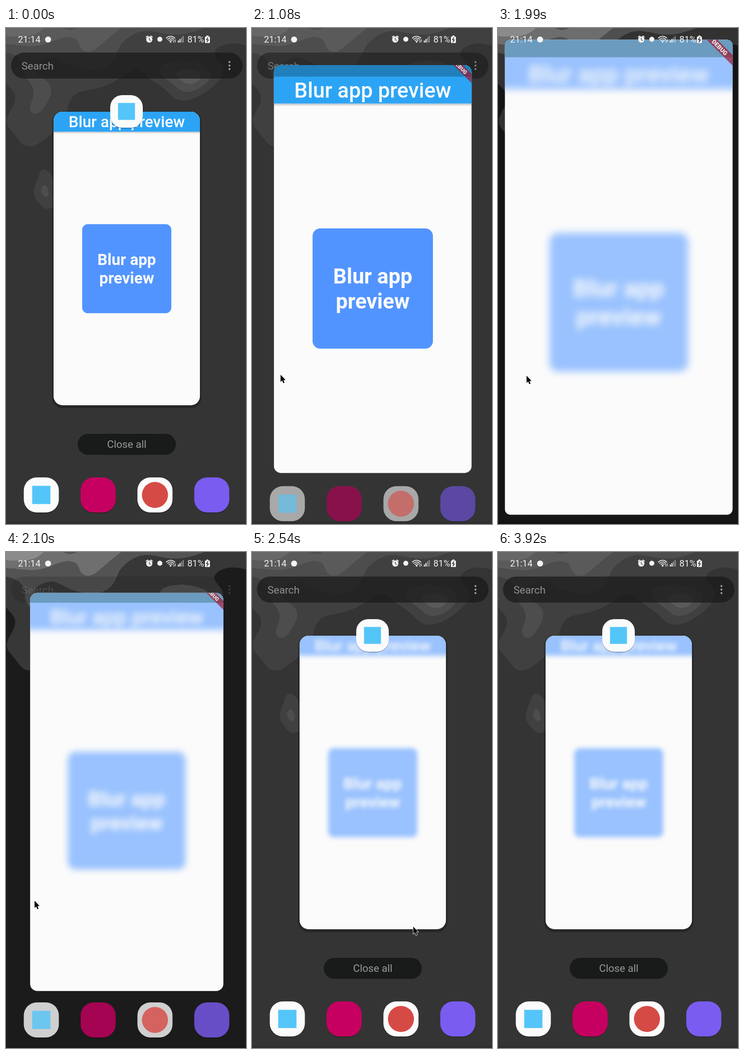
These frames come from a looping animation (479x990 px, 4010 ms). An HTML page with a canvas:

```html
<!DOCTYPE html>
<html lang="en">
<head>
<meta charset="utf-8">
<title>Blur app preview</title>
<style>
html, body { margin: 0; width: 100%; height: 100%; overflow: hidden; background: #333434; }
canvas { display: block; width: 479px; height: 990px; }
</style>
</head>
<body>
<canvas id="stage"></canvas>
<script>
const W = 479, H = 990, LOOP = 4010, MID = 241;
const OPEN = [858, 1288], BLUR = [1660, 1760], CLOSE = [1881, 2311], BADGE = [2370, 2520];
const FONT = 'Roboto, sans-serif', PAPER = '#fbfbfb', INK = '#f4f4f4';

const canvas = document.getElementById('stage');
const c = canvas.getContext('2d');
const dpr = window.devicePixelRatio || 1;
canvas.width = W * dpr;
canvas.height = H * dpr;

const clamp = v => Math.max(0, Math.min(1, v));
const lerp = (a, b, k) => a + (b - a) * k;
const span = (t, [a, b]) => clamp((t - a) / (b - a));
const smooth = u => u * u * (3 - 2 * u);
const mix = (from, to, k) => `rgb(${from.map((v, i) => Math.round(lerp(v, to[i], k)))})`;

function rect(x, y, w, h, fill) {
  c.fillStyle = fill;
  c.fillRect(x, y, w, h);
}

function box(x, y, w, h, r, fill) {
  c.fillStyle = fill;
  c.beginPath();
  c.roundRect(x, y, w, h, r);
  c.fill();
}

function disc(x, y, r, fill) {
  c.fillStyle = fill;
  c.beginPath();
  c.arc(x, y, r, 0, Math.PI * 2);
  c.fill();
}

function text(str, x, y, size, fill, weight = 400, align = 'left') {
  c.font = `${weight} ${size}px ${FONT}`;
  c.textAlign = align;
  c.fillStyle = fill;
  c.fillText(str, x, y);
}

function line(points, width, color) {
  c.strokeStyle = color;
  c.lineWidth = width;
  c.lineCap = c.lineJoin = 'round';
  c.beginPath();
  points.forEach(([x, y]) => c.lineTo(x, y));
  c.stroke();
}

// Height of the wallpaper's terrain: a slope from the top edge plus a few hills
function terrain(px, py) {
  const x = px + 13 * Math.sin(py / 29) + 6 * Math.sin(py / 13 + px / 40);
  const y = py + 12 * Math.sin(px / 34 + 1);
  const hill = (cx, cy, rx, ry, a) => a * Math.exp(-(((x - cx) / rx) ** 2) - ((y - cy) / ry) ** 2);
  return 0.1 * Math.exp(-Math.max(0, y) / 60)
    + hill(25, 5, 70, 45, 0.15)
    + hill(55, 150, 60, 110, 0.1)
    + hill(70, 325, 24, 38, 0.1)
    + hill(190, 40, 70, 80, 0.1)
    + hill(360, 90, 55, 38, 0.15);
}

// Terraced terrain as white of varying alpha, stored at double strength
const land = document.createElement('canvas');
land.width = W;
land.height = 400;
{
  const l = land.getContext('2d');
  const img = l.createImageData(W, land.height);
  const step = 0.05;
  for (let i = 0; i < W * land.height; i++) {
    const level = Math.floor(terrain(i % W, Math.floor(i / W)) / step) * step * 1.25;
    img.data.fill(255, i * 4, i * 4 + 3);
    img.data[i * 4 + 3] = clamp(level * 2) * 255;
  }
  l.putImageData(img, 0, 0);
}

function wallpaper(dark) {
  const v = Math.round(52 * (1 - dark));
  rect(0, 0, W, H, `rgb(${v},${v},${v})`);
  c.globalAlpha = clamp(0.5 + dark);
  c.drawImage(land, 0, 0);
  c.globalAlpha = 1;
  rect(0, 986, W, 4, 'rgba(0,0,0,.12)');
}

function searchBar(alpha) {
  c.globalAlpha = alpha;
  box(10, 49, 462, 52, 26, 'rgba(25,26,26,.72)');
  text('Search', 31, 83, 20.8, '#8f9090');
  for (let i = -1; i < 2; i++) disc(446, 75 + 7 * i, 1.9, '#a4a4a4');
  c.globalAlpha = 1;
}

function closeAll(alpha) {
  c.globalAlpha = alpha;
  box(143, 810, 196, 42, 21, '#191a1a');
  text('Close all', MID, 838, 20.7, '#999', 400, 'center');
  c.globalAlpha = 1;
}

function tile(x, y, size, fill) {
  const h = size / 2;
  box(x - h, y - h + 1.5, size, size, size * 0.37, 'rgba(0,0,0,.3)');
  box(x - h, y - h, size, size, size * 0.37, fill);
}

function bluePlate(x, y, size) {
  const s = size * 0.52;
  tile(x, y, size, PAPER);
  rect(x - s / 2, y - s / 2, s, s, '#54c5f8');
}

function dock(alpha, shift) {
  const y = 932 + shift;
  const x = i => 70.5 + 113.4 * i;
  c.globalAlpha = alpha;
  bluePlate(x(0), y, 70);
  tile(x(1), y, 70, '#c60060');
  tile(x(2), y, 70, PAPER);
  disc(x(2), y, 26, '#d64a45');
  tile(x(3), y, 70, '#7a5cf0');
  c.globalAlpha = 1;
}

// The app's page; blur 0..1 softens and pales everything below the status strip
function page(blur, scale) {
  const pale = [153, 194, 254];
  const left = -80, wide = 642;
  rect(left, 0, wide, 1020, PAPER);
  if (blur > 0) c.filter = `blur(${8 * blur * scale * dpr}px)`;

  const g = c.createLinearGradient(0, 108, 0, 115);
  g.addColorStop(0, 'rgba(0,0,0,.22)');
  g.addColorStop(1, 'rgba(0,0,0,.03)');
  c.globalAlpha = 1 - blur;
  rect(left, 108, wide, 6, g);
  c.globalAlpha = 1;

  rect(left, -80, wide, 188, mix([44, 164, 245], pale, blur));
  text('Blur app preview', MID, 94, 52, PAPER, 500, 'center');
  box(93, 415, 296, 296, 19, mix([82, 148, 255], pale, blur));
  text('Blur app', MID, 551, 52, PAPER, 700, 'center');
  text('preview', MID, 612, 52, PAPER, 700, 'center');
  c.filter = 'none';
  rect(left, 0, wide, 42 - 2 * blur, mix([33, 127, 187], [107, 155, 191], blur));
}

function debugRibbon() {
  c.save();
  c.translate(456.5, 19);
  c.rotate(Math.PI / 4);
  rect(-70, -8, 140, 16, 'rgba(160,20,40,.68)');
  text('DEBUG', 0, 4.6, 13, 'rgba(255,255,255,.88)', 900, 'center');
  c.restore();
}

// p: 0 in the overview, 1 at full screen
function card(p, blur) {
  const s = lerp(0.601, 1, p);
  const y0 = 142 * (1 - p) - 16 * p * (1 - p);
  const crop = 41.6 * Math.pow(1 - p, 1.5);
  const x = MID - 243 * s, y = y0 + crop * s;
  const w = 486 * s, h = (1016.6 - crop) * s;
  const r = lerp(18, 10, p);

  box(x - 3, y - 1, w + 6, h + 7, r + 3, `rgba(0,0,0,${0.25 * (1 - p) ** 12})`);
  c.save();
  c.beginPath();
  c.roundRect(x, y, w, h, r);
  c.clip();
  c.translate(MID * (1 - s), y0);
  c.scale(s, s);
  page(blur, s);
  if (p > 0) debugRibbon();
  c.restore();
}

function badge(k) {
  if (k <= 0) return;
  c.globalAlpha = k;
  bluePlate(240.5, 166.5, 65 * lerp(0.7, 1, k));
  c.globalAlpha = 1;
}

function statusBar() {
  text('21:14', 24, 29, 18, INK);
  disc(84, 23, 6, INK);

  // alarm clock
  disc(286, 23, 6.2, INK);
  line([[280, 18], [283, 16]], 2, INK);
  line([[289, 16], [292, 18]], 2, INK);
  line([[286, 20], [286, 23.5], [288.5, 25]], 1.3, '#444');

  disc(307, 22.5, 5, INK);

  // wireless
  c.lineWidth = 1.7;
  c.strokeStyle = INK;
  for (let r = 4.5; r < 12; r += 3.5) {
    c.beginPath();
    c.arc(328.5, 28, r, -Math.PI * 0.76, -Math.PI * 0.24);
    c.stroke();
  }
  disc(328.5, 27.5, 1.8, INK);
  line([[335, 24], [335, 29]], 1.2, INK);
  line([[338, 23], [338, 28]], 1.2, INK);

  // signal
  for (let i = 0; i < 4; i++) {
    rect(343 + i * 3.2, 25 - i * 3, 2, 4 + i * 3, i < 2 ? INK : 'rgba(244,244,244,.5)');
  }

  text('81%', 362, 29, 18, INK);
  box(397, 17, 10, 13, 1.5, INK);
  rect(400, 15, 4, 3, INK);
  line([[403, 19], [400, 23.5], [404, 23.5], [401, 28]], 1.5, '#333');
}

// The pointer slides in from the left, rests, then leaves to the right
function pointer(t) {
  const enter = 1 - smooth(span(t, [60, 560]));
  const leave = Math.max(0, t - 2105) / 135;
  if (t < 60 || leave > 5.5) return;
  c.save();
  c.translate(57 - 75 * enter + 82 * leave, 692 - 40 * enter + 4 * span(t, [1881, 2100]) + 16 * leave);
  c.beginPath();
  [[0, 0], [0, 14.5], [3.2, 11.6], [5.4, 17], [8, 15.8], [5.8, 10.8], [10, 10.6]].forEach(([x, y]) => c.lineTo(x, y));
  c.closePath();
  c.strokeStyle = '#fff';
  c.lineWidth = 1.6;
  c.lineJoin = 'round';
  c.stroke();
  c.fillStyle = '#080808';
  c.fill();
  c.restore();
}

function draw(t) {
  const closing = t >= BLUR[0];
  const p = closing ? 1 - smooth(span(t, CLOSE)) : smooth(span(t, OPEN));
  const ui = closing ? clamp(1 - 1.5 * p) : 1 - 0.5 * p;

  c.setTransform(dpr, 0, 0, dpr, 0, 0);
  wallpaper(closing ? Math.min(p, 0.6) : 0);
  searchBar(ui);
  closeAll(closing ? ui : clamp(1 - 2 * p));
  dock(closing ? clamp(1.1 - 0.6 * p) : 1 - 0.75 * p, closing ? 4 * p : 33 * p);
  card(p, span(t, BLUR));
  badge(closing ? span(t, BADGE) : 1 - span(t, [OPEN[0] - 60, OPEN[0] + 60]));
  statusBar();
  pointer(t);
}

const start = performance.now();
function tick() {
  draw((performance.now() - start) % LOOP);
  requestAnimationFrame(tick);
}
tick();
</script>
</body>
</html>
```
